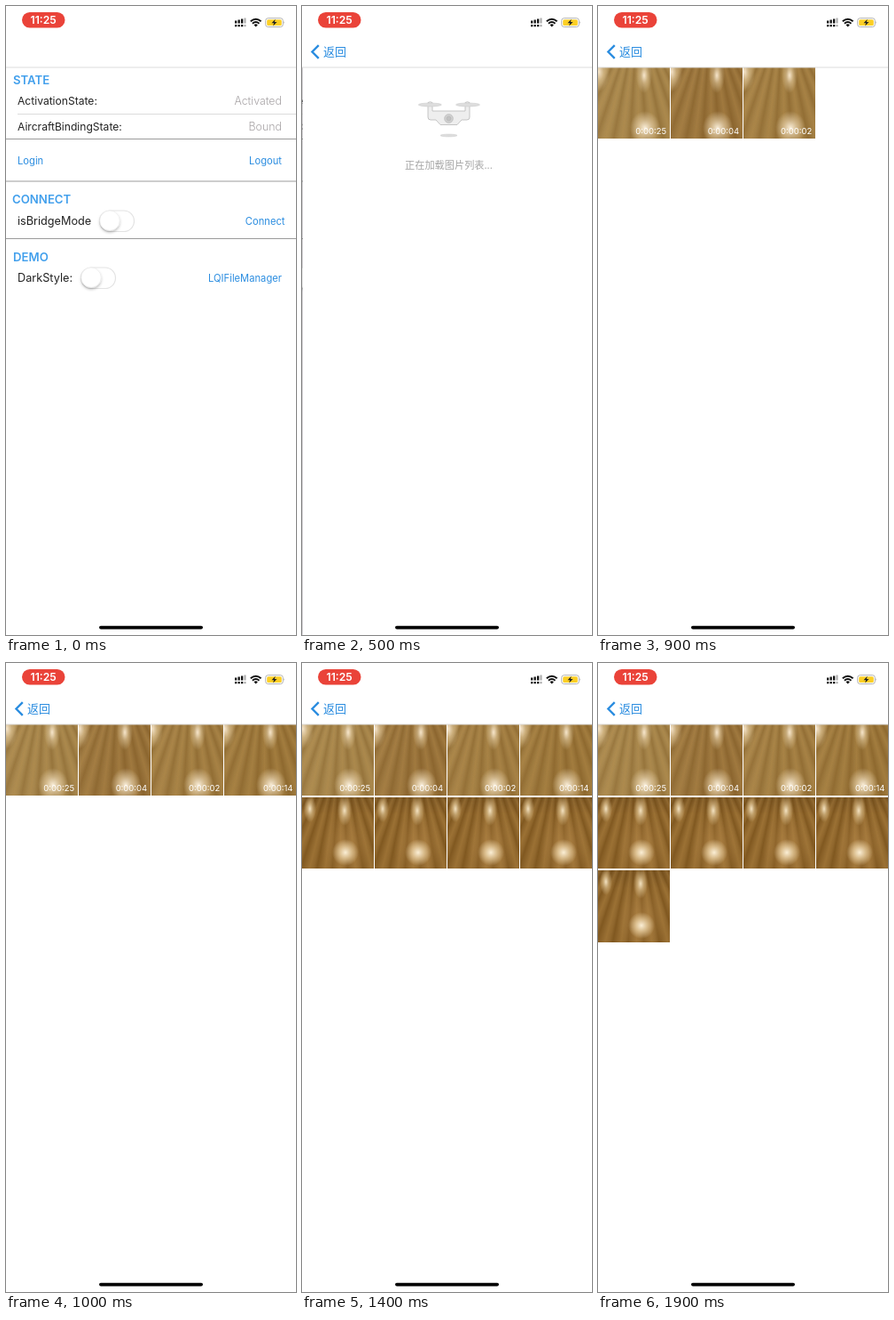
Write an HTML page that moves like this. It is 327 px wide and 707 px high and loops after 2 s.

```html
<!DOCTYPE html>
<html lang="zh">
<head>
<meta charset="utf-8">
<title>File manager</title>
<style>
  @property --count { syntax: "<integer>"; inherits: true; initial-value: 0; }

  html, body { margin: 0; width: 100%; height: 100%; overflow: hidden; background: #fff; }
  #stage { position: absolute; left: 0; top: 0; width: 327px; height: 707px; overflow: hidden; }
  .layer { position: absolute; left: 0; top: 0; width: 327px; height: 707px; }
  svg { display: block; font-family: Inter, Roboto, sans-serif; }
  .cjk { font-family: "Noto Sans CJK SC", "Noto Sans CJK", sans-serif; }

  .home, .page, .back, .back-label, .pressed, .loading { animation: 2s step-end infinite; }
  .home { animation-name: home; }
  .page { animation-name: page; background: #fff; box-shadow: -1px 0 5px rgba(0, 0, 0, .22); }
  .back { animation-name: back; }
  .back-label { animation-name: back-label; }
  .pressed { animation-name: pressed; }
  .loading { animation-name: loading; }

  @keyframes home {
    0%  { transform: none; background: #fff; }
    15% { transform: translateX(-36px); background: #f8f6fa; }
    20% { transform: translateX(-93px); background: #ebe8ee; }
    25%, 100% { transform: translateX(-98px); background: #e8e6ea; }
  }
  @keyframes page {
    0%  { transform: translateX(340px); }
    15% { transform: translateX(206px); }
    20% { transform: translateX(17px); }
    25% { transform: translateX(1px); }
    30%, 100% { transform: none; }
  }
  @keyframes back {
    0%  { opacity: 0; }
    15% { opacity: .4; }
    20% { opacity: .95; }
    25%, 100% { opacity: 1; }
  }
  @keyframes back-label {
    0%  { transform: translateX(41px); }
    15% { transform: translateX(26px); }
    20% { transform: translateX(2px); }
    25%, 100% { transform: none; }
  }
  @keyframes pressed { 0% { opacity: 1; } 5%, 100% { opacity: .35; } }
  @keyframes loading { 0% { opacity: 1; } 35%, 100% { opacity: 0; } }

  .heading { font-size: 13.2px; font-weight: 600; fill: #419fec; }
  .label { font-size: 12.1px; fill: #222; }
  .wide { font-size: 12.7px; }
  .value { font-size: 12.4px; font-weight: 300; fill: #a8a4a6; text-anchor: end; }
  .link { font-size: 11.2px; fill: #2b8de0; }
  .end { text-anchor: end; }
  .rule { stroke: #9b9b9b; stroke-width: 1; }
  .faint { stroke: #dcdcdc; }

  #thumbs { animation: count 2s infinite; }
  @keyframes count {
    0%  { --count: 0; }
    30% { --count: 0; animation-timing-function: steps(10, end); }
    80%, 100% { --count: 10; }
  }
  .thumb {
    position: absolute; width: 80.6px; height: 80.4px;
    opacity: clamp(0, var(--count) - var(--index), 1);
    background:
      radial-gradient(ellipse 7px 15px at 9px 13px, #fff0d0e8, #f0d6a588 45%, transparent),
      radial-gradient(ellipse 8px 17px at 48px 15px, #fff0d0e8, #f0d6a588 45%, transparent),
      radial-gradient(circle 15px at 49px 62px, #fff4dcf5, #f5deb3a8 45%, transparent),
      radial-gradient(ellipse 28px 40px at 49px 55px, #c4965866, transparent),
      repeating-conic-gradient(from 0deg at 55% -75%, #59330000 0deg, #59330048 2.2deg, #59330000 3.6deg, #d7a75b28 5.5deg, #59330000 7deg),
      linear-gradient(#5b3d1755, transparent 25%),
      var(--wood);
  }
  .thumb.video {
    background:
      radial-gradient(ellipse 12px 22px at 1px 5px, #fff0d8e8, #ecd6ac80 45%, transparent),
      radial-gradient(ellipse 9px 20px at 52px 9px, #fff0d8e8, #ecd6ac80 45%, transparent),
      radial-gradient(ellipse 17px 19px at 53px 68px, #fff4e0f0, #f0dcb898 45%, transparent),
      repeating-conic-gradient(from 1deg at 55% -75%, #59330000 0deg, #59330030 2.4deg, #59330000 4.5deg, #d7a75b20 6deg, #59330000 7.5deg),
      linear-gradient(100deg, #c5a66c30, transparent 60%),
      var(--wood);
  }
  .thumb span {
    position: absolute; right: 3.5px; bottom: 2.5px;
    font: 9.5px/12px Inter, Roboto, sans-serif; color: #fff;
  }
</style>
</head>
<body>
<div id="stage">
  <svg class="layer home" viewBox="0 0 327 707">
    <defs>
      <filter id="soft" x="-50%" y="-50%" width="200%" height="200%">
        <feDropShadow dx="0" dy="2" stdDeviation="1.5" flood-opacity=".25"/>
      </filter>
      <g id="toggle">
        <rect x=".5" y=".5" width="39" height="23.5" rx="11.75" fill="#fff" stroke="#e3e3e3" stroke-width="1.2"/>
        <circle cx="12" cy="11.7" r="11.2" fill="#fff" stroke="#e2e2e2" stroke-width=".5" filter="url(#soft)"/>
      </g>
    </defs>
    <text class="heading" x="8" y="88">STATE</text>
    <text class="label" x="13" y="111">ActivationState:</text>
    <text class="value" x="311" y="111">Activated</text>
    <path class="rule faint" d="M13 121.5H327"/>
    <text class="label" x="13" y="139.5">AircraftBindingState:</text>
    <text class="value" x="311" y="139.5">Bound</text>
    <path class="rule" d="M0 149.5H327M0 197H327M0 261.5H327"/>
    <text class="link" x="13" y="178">Login</text>
    <text class="link end" x="311" y="178">Logout</text>
    <text class="heading" x="7" y="222">CONNECT</text>
    <text class="label wide" x="13" y="246">isBridgeMode</text>
    <use href="#toggle" x="105" y="229.5"/>
    <text class="link end" x="314.5" y="246">Connect</text>
    <text class="heading" x="8" y="286.5">DEMO</text>
    <text class="label wide" x="13" y="310">DarkStyle:</text>
    <use href="#toggle" x="84" y="293.5"/>
    <text class="link end pressed" x="311" y="310">LQIFileManager</text>
  </svg>

  <div class="layer page">
    <svg class="layer loading" viewBox="0 0 327 707">
      <g fill="#eee" stroke="#b8b8b8" stroke-width=".8">
        <path d="M141 108.5q2.500-1.500 5 0V118H183V108.5q2.500-1.500 5 0V125q0 3-3 3H179l-5 5.500H155l-5-5.500H144q-3 0-3-3Z"/>
        <circle cx="164.500" cy="126.500" r="4.800" fill="#d2d2d2"/>
        <circle cx="164.500" cy="126.500" r="2.500" fill="#c2c2c2"/>
        <g fill="#ddd" stroke="#c8c8c8" stroke-width=".5">
          <ellipse cx="143.300" cy="111" rx="13" ry="2"/>
          <ellipse cx="186" cy="111" rx="13.500" ry="2"/>
          <ellipse cx="164.500" cy="145.500" rx="9.500" ry="1.400"/>
        </g>
      </g>
      <text class="cjk" x="115" y="183" font-size="11.2" fill="#a5a5a5">正在加载图片列表...</text>
    </svg>
    <div id="thumbs"></div>
  </div>

  <svg class="layer" viewBox="0 0 327 707">
    <rect width="327" height="69" fill="#fff"/>
    <path class="rule faint" d="M0 69H327" stroke-width=".8"/>
    <rect x="18" y="7" width="48.500" height="17.500" rx="8.750" fill="#ea4339"/>
    <text x="42.200" y="20.200" font-size="12.200" font-weight="600" fill="#fff" text-anchor="middle">11:25</text>

    <g fill="#111">
      <path d="M258 16.500h2.300v3h-2.300zM261.500 15.500h2.300v4h-2.300zM265 14.500h2.300v5h-2.300z"/>
      <path d="M258 21h2.300v2.200h-2.300zM261.500 21h2.300v2.200h-2.300zM265 21h2.300v2.200h-2.300z"/>
      <path d="M268.500 13.500h2v6h-2zM268.500 21h2v2.200h-2z" fill="#aaa"/>
      <path d="M281.700 23.500l-2.200-2.300q2.200-1.800 4.400 0Z"/>
    </g>
    <path d="M275.800 17.200q5.900-5 11.800 0M277.900 19.700q3.800-3.200 7.600 0" fill="none" stroke="#111" stroke-width="1.900"/>
    <rect x="292.700" y="13.700" width="19.600" height="9.800" rx="2.700" fill="#fff" stroke="#aaa" stroke-width=".9"/>
    <rect x="294.200" y="15.200" width="16.600" height="6.800" rx="1.500" fill="#fccf25"/>
    <path d="M313.300 17v3.200q1.500-1.600 0-3.200Z" fill="#aaa"/>
    <path d="M303.800 14.800l-4.300 4.400h2.600l-1 3.300 4.400-4.500h-2.700Z" fill="#222"/>

    <g class="back">
      <path d="M18.800 44.200L11.500 51.500L18.800 58.800" fill="none" stroke="#2b8de0" stroke-width="2.400"/>
      <text class="cjk back-label" x="24" y="56.200" font-size="13" fill="#2b8de0">返回</text>
    </g>
    <rect x="105" y="696.800" width="117" height="3.600" rx="1.800" fill="#000"/>
  </svg>
</div>

<script>
  const durations = ["0:00:25", "0:00:04", "0:00:02", "0:00:14"];
  const woods = ["#a5844a", "#98723a", "#a07c41", "#9b763a"];
  const thumbs = document.getElementById("thumbs");

  for (let i = 0; i < 9; i++) {
    const thumb = document.createElement("div");
    thumb.className = "thumb";
    thumb.style.left = (i % 4) * 82.13 + "px";
    thumb.style.top = 69 + Math.floor(i / 4) * 82.1 + "px";
    thumb.style.setProperty("--index", i);
    thumb.style.setProperty("--wood", woods[i] || "#90672d");
    if (durations[i]) {
      thumb.classList.add("video");
      thumb.appendChild(document.createElement("span")).textContent = durations[i];
    }
    thumbs.appendChild(thumb);
  }
</script>
</body>
</html>
```
